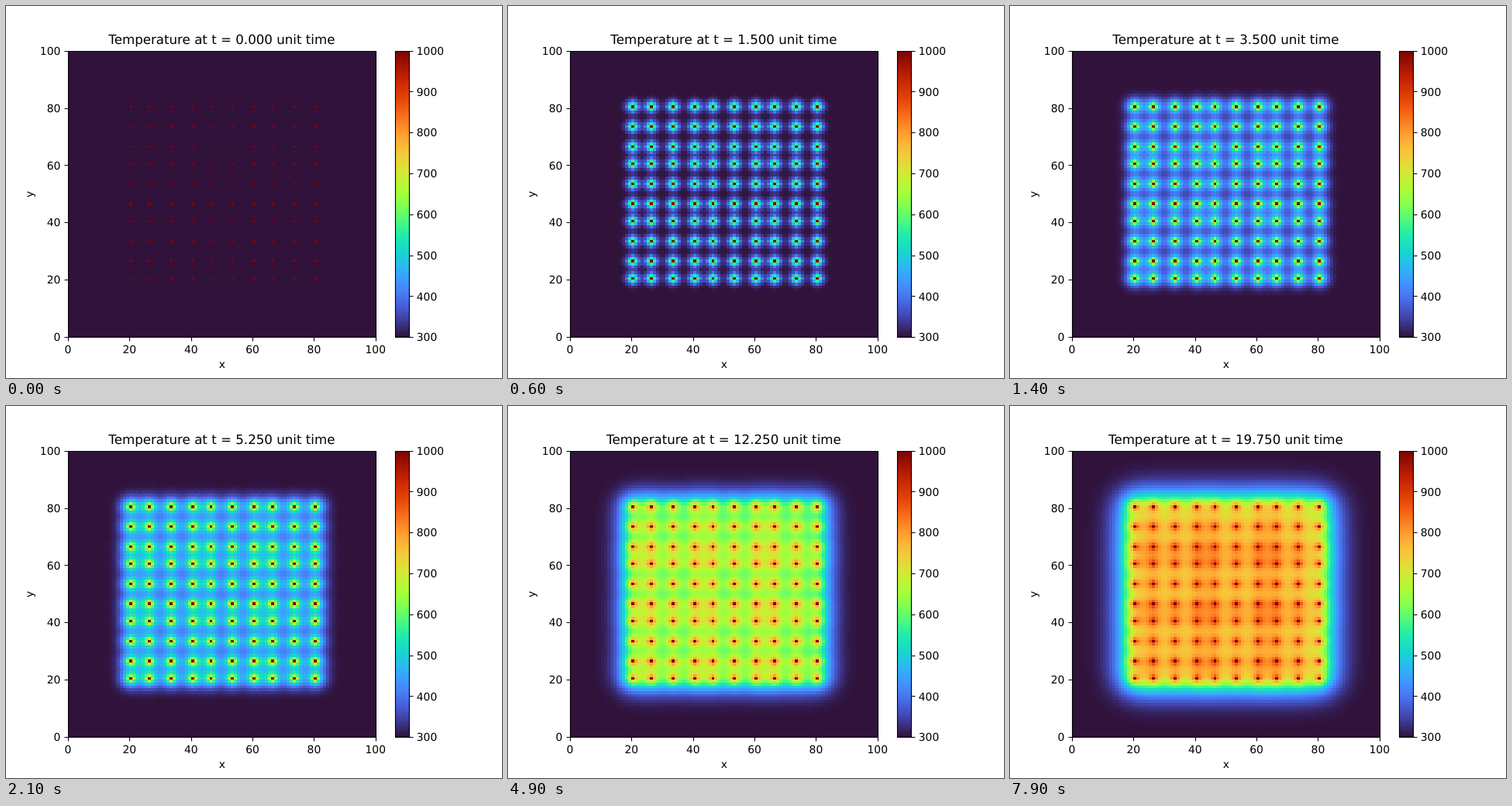
An HTML page with a canvas that plays this animation: 640 by 480 pixels, repeating every 8000 ms.

```html
<!DOCTYPE html>
<html lang="en">
<head>
<meta charset="utf-8">
<title>Heat diffusion</title>
<style>
  html, body { margin: 0; width: 100%; height: 100%; overflow: hidden; background: #fff; }
  canvas, svg { position: absolute; left: 0; top: 0; width: 640px; height: 480px; display: block; }
  text { font: 13.889px "DejaVu Sans", Verdana, sans-serif; fill: #000; text-rendering: geometricPrecision; }
  #title { font-size: 16.667px; }
  .mid { text-anchor: middle; }
  .end { text-anchor: end; }
  path { fill: none; stroke: #000; stroke-width: 1.11; }
</style>
</head>
<body>
<canvas id="stage" width="640" height="480"></canvas>
<svg id="axes" viewBox="0 0 640 480">
  <text id="title" class="mid" x="278.4" y="49"></text>
  <text class="mid" x="278.8" y="467">x</text>
  <text class="mid" transform="translate(35 243) rotate(-90)">y</text>
</svg>
<script>
const N = 100, STEPS = 80, STEP_MS = 100, DT = 0.25;
const COLD = 300, HOT = 1000;
const plot = { x: 80, y: 57.6, w: 396.8, h: 369.6 };
const bar = { x: 501.6, w: 18.48 };
const bottom = plot.y + plot.h;
const left = 80, right = 477, top_ = 58, base = 427;

// Colour map knots, every 15th of 256 levels
const knots = [
  [48, 18, 59], [63, 62, 156], [70, 102, 221], [69, 140, 253], [47, 178, 244], [26, 212, 208],
  [34, 235, 170], [82, 250, 122], [139, 255, 75], [183, 247, 53], [219, 226, 54], [245, 197, 58],
  [254, 161, 48], [249, 117, 29], [232, 75, 12], [206, 45, 4], [169, 22, 1], [122, 4, 3]
];

function knot(i, c) {
  const last = knots.length - 1;
  if (i < 0) return 2 * knots[0][c] - knots[1][c];
  if (i > last) return 2 * knots[last][c] - knots[last - 1][c];
  return knots[i][c];
}

// Catmull-Rom between the knots
function levelColor(level) {
  const i = Math.min(Math.floor(level / 15), knots.length - 2);
  const u = level / 15 - i;
  return [0, 1, 2].map(c => {
    const [a, b, d, e] = [-1, 0, 1, 2].map(k => knot(i + k, c));
    const v = b + 0.5 * u * (d - a + u * (2 * a - 5 * b + 4 * d - e + u * (3 * (b - d) + e - a)));
    return Math.max(0, Math.min(255, Math.round(v)));
  });
}

const palette = Array.from({ length: 256 }, (_, i) => levelColor(i));
const level = v => Math.max(0, Math.min(255, Math.floor(v * 256)));

// Heat equation with a 10 x 10 grid of cells held hot and cold borders
const spots = Array.from({ length: 10 }, (_, i) => Math.floor(20 + i * 60 / 9 + 1e-9));

function heat(u) {
  for (const r of spots) for (const c of spots) u[r * N + c] = HOT;
  return u;
}

function diffuse(u) {
  const next = u.slice();
  for (let r = 1; r < N - 1; r++) {
    for (let c = 1; c < N - 1; c++) {
      const k = r * N + c;
      next[k] = u[k] + DT * (u[k - 1] + u[k + 1] + u[k - N] + u[k + N] - 4 * u[k]);
    }
  }
  return heat(next);
}

const states = [heat(new Float64Array(N * N).fill(COLD))];
while (states.length < STEPS) states.push(diffuse(states[states.length - 1]));

const ctx = document.getElementById("stage").getContext("2d");
const mesh = ctx.createImageData(right - left, base - top_);
const cellOf = f => Math.max(0, Math.min(N - 1, Math.floor(f * N)));
const cols = Array.from({ length: mesh.width }, (_, i) => cellOf((left + i + 0.5 - plot.x) / plot.w));
const rows = Array.from({ length: mesh.height }, (_, i) => cellOf((bottom - top_ - i - 0.5) / plot.h));

function drawMesh(u) {
  let p = 0;
  for (const r of rows) {
    for (const c of cols) {
      const rgb = palette[level((u[r * N + c] - COLD) / (HOT - COLD))];
      mesh.data[p++] = rgb[0];
      mesh.data[p++] = rgb[1];
      mesh.data[p++] = rgb[2];
      mesh.data[p++] = 255;
    }
  }
  ctx.putImageData(mesh, left, top_);
}

function drawBar() {
  for (let y = top_; y < base; y++) {
    ctx.fillStyle = `rgb(${palette[level((bottom - y - 0.5) / plot.h)]})`;
    ctx.fillRect(502, y, 18, 1);
  }
}

const svg = document.getElementById("axes");
const title = document.getElementById("title");
const snap = v => Math.floor(v + 0.5) + 0.5;

function add(tag, attrs, text = "") {
  const el = document.createElementNS("http://www.w3.org/2000/svg", tag);
  for (const key in attrs) el.setAttribute(key, attrs[key]);
  el.textContent = text;
  svg.append(el);
}

function drawAxes() {
  let d = "M80.5 58.5H477.5V427.5H80.5ZM502.5 58.5H520.5V427.5H502.5Z";
  for (let v = 0; v <= 100; v += 20) {
    const x = plot.x + plot.w * v / 100;
    const y = bottom - plot.h * v / 100;
    d += `M${snap(x)} 427.5v5M80.5 ${snap(y)}h-5`;
    add("text", { x, y: 448, class: "mid" }, v);
    add("text", { x: 70.3, y: Math.round(y + 5.1), class: "end" }, v);
  }
  for (let v = COLD; v <= HOT; v += 100) {
    const y = bottom - plot.h * (v - COLD) / (HOT - COLD);
    d += `M520.5 ${snap(y)}h5`;
    add("text", { x: bar.x + bar.w + 9.72, y: Math.round(y + 5.1) }, v);
  }
  add("path", { d });
}

let shown = -1;
function tick() {
  const step = Math.floor(performance.now() / STEP_MS) % STEPS;
  if (step !== shown) {
    shown = step;
    drawMesh(states[step]);
    title.textContent = `Temperature at t = ${(step * DT).toFixed(3)} unit time`;
  }
  requestAnimationFrame(tick);
}

drawBar();
drawAxes();
tick();
</script>
</body>
</html>
```
